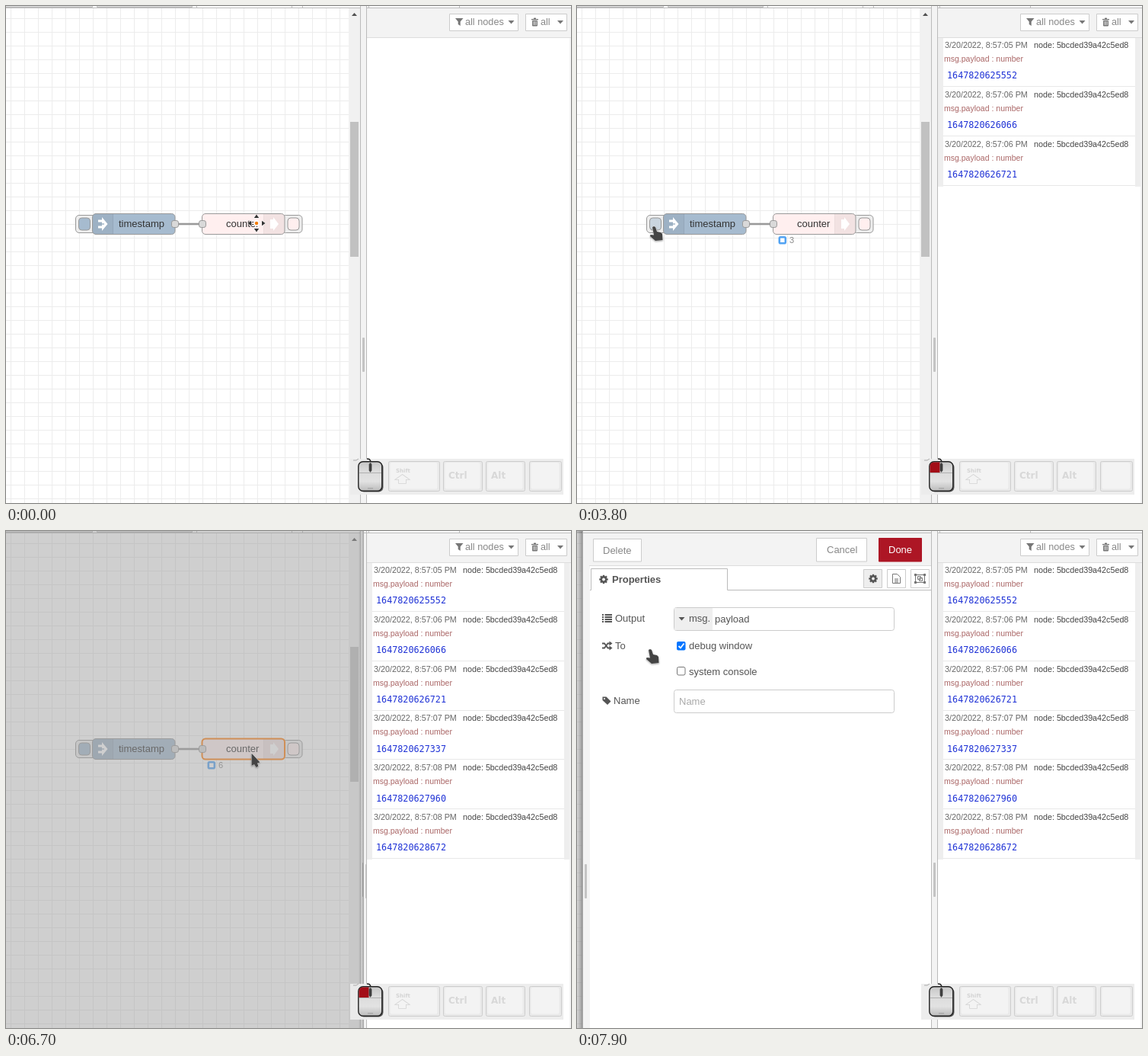
Animation, 742 px wide and 652 px high, one loop 8 s. Source, as an HTML page with a canvas:

```html
<!DOCTYPE html>
<html lang="en">
<head>
<meta charset="utf-8">
<title>Flow editor</title>
<style>
html, body { margin: 0; width: 100%; height: 100%; overflow: hidden; background: #fff; }
canvas { display: block; }
</style>
</head>
<body>
<canvas id="stage" width="742" height="652"></canvas>
<script>
const ctx = document.getElementById('stage').getContext('2d');
const LOOP = 8000, STEP = 50;
const SELECT = 6300, OPEN = 6700, RELEASE = 6800;
const SANS = '"Liberation Sans", Arial, sans-serif';
const MONO = '"DejaVu Sans Mono", monospace';
const KEYCAP = '"DejaVu Sans", sans-serif';

// Every click injects its clock time; the click's place in the loop follows from it
const clicks = [0, 514, 1169, 1785, 2408, 3120].map(offset => ({
  press: Math.round((2039 + offset) / STEP) * STEP,
  stamp: 1647820625552 + offset
}));
const MESSAGE_DELAY = 150, HOLD = 350;

// Pointer moves: start, end, destination and how far the arc bends downwards
const moves = [
  { from: 50, to: 100, x: 333, y: 284, bend: 0 },
  { from: 250, to: 1050, x: 126, y: 295, bend: -78 },
  { from: 1100, to: 1300, x: 194, y: 294, bend: 8 },
  { from: 1650, to: 1750, x: 102, y: 289, bend: 0 },
  { from: 5390, to: 6100, x: 322, y: 291, bend: 10 },
  { from: 7200, to: 7350, x: 367, y: 300, bend: 0 },
  { from: 7350, to: 7900, x: 97, y: 155, bend: -98 }
];
function pointerAt(t) {
  let x = 329, y = 285;
  for (const m of moves) {
    const k = Math.min(1, Math.max(0, (t - m.from) / (m.to - m.from)));
    x += (m.x - x) * k;
    y += (m.y - y) * k + m.bend * 4 * k * (1 - k);
  }
  return [x, y];
}

// CSS "ease": cubic-bezier(.25, .1, .25, 1)
function ease(x) {
  if (x <= 0 || x >= 1) return x <= 0 ? 0 : 1;
  let lo = 0, hi = 1, s;
  for (let i = 0; i < 20; i++) {
    s = (lo + hi) / 2;
    if (.75 * s * (1 - s) + s ** 3 < x) lo = s; else hi = s;
  }
  return .3 * s * (1 - s) ** 2 + 3 * s * s * (1 - s) + s ** 3;
}

function rect(x, y, w, h, fill) {
  ctx.fillStyle = fill;
  ctx.fillRect(x, y, w, h);
}
function paint(fill, stroke, width) {
  if (fill) { ctx.fillStyle = fill; ctx.fill(); }
  if (stroke) { ctx.strokeStyle = stroke; ctx.lineWidth = width; ctx.stroke(); }
}
function box(x, y, w, h, r, fill, stroke, width = 1) {
  ctx.beginPath();
  ctx.roundRect(x, y, w, h, r);
  paint(fill, stroke, width);
}
function disc(x, y, r, fill, stroke, width) {
  ctx.beginPath();
  ctx.arc(x, y, r, 0, 2 * Math.PI);
  paint(fill, stroke, width);
}
function trace(points) {
  ctx.beginPath();
  for (let i = 0; i < points.length; i += 2) ctx.lineTo(points[i], points[i + 1]);
}
function line(points, color, width = 1) {
  trace(points);
  paint(null, color, width);
}
function poly(points, fill, stroke, width = 1) {
  trace(points);
  ctx.closePath();
  paint(null, stroke, width);
  paint(fill);
}
function text(s, x, y, color, size = 13, family = SANS, weight = '') {
  ctx.font = `${weight} ${size}px ${family}`;
  ctx.fillStyle = color;
  ctx.fillText(s, x, y);
}
function at(x, y, draw) {
  ctx.save();
  ctx.translate(x, y);
  draw();
  ctx.restore();
}
function gradient(x0, y0, x1, y1, ...colors) {
  const g = ctx.createLinearGradient(x0, y0, x1, y1);
  colors.forEach((c, i) => g.addColorStop(i / (colors.length - 1), c));
  return g;
}
// Triangle pointing right, centred on its base
const head = (x, y, length, half, color) => poly([x, y - half, x + length, y, x, y + half], color);
const caret = (x, y, color) => poly([x - 4, y - 2, x + 4, y - 2, x, y + 2.5], color);

function drawWorkspace() {
  rect(0, 0, 742, 652, '#fff');
  for (let x = 6; x < 450; x += 18) rect(x, 3, 1, 649, '#ececec');
  for (let y = 16; y < 652; y += 18) rect(0, y, 450, 1, '#ececec');
  for (const [x, w] of [[-1, 115], [119, 126]]) box(x + .5, -1.5, w - 1, 3, 0, '#ddd', '#bbb');
  for (const x of [250, 375, 389]) rect(x, 0, 1, 2, '#bbb');
  rect(0, 2, 465, 1, '#bbb');

  rect(450, 3, 15, 649, '#f1f1f1');
  rect(452, 152, 11, 177, '#c1c1c1');
  poly([454, 13, 461, 13, 457.5, 9], '#505050');
}

function drawNodeButton(x, innerX, color, alpha) {
  box(x, 274.5, 26, 23, 4.5, '#eee', '#999');
  ctx.globalAlpha = alpha;
  box(innerX, 278, 15, 16, 4, color);
  ctx.globalAlpha = 1;
  box(innerX, 278, 15, 16, 4, null, '#999');
}
function drawNode(x, color, label, labelX, iconX, radii, edgeX, selected) {
  box(x, 272.5, 108.5, 27, 4.5, color);
  box(iconX, 272.5, 27, 27, radii, 'rgba(0,0,0,.05)');
  rect(edgeX, 273, 1, 26, 'rgba(0,0,0,.08)');
  box(x, 272.5, 108.5, 27, 4.5, null, selected ? '#ff7f0e' : '#999', selected ? 2 : 1);
  text(label, labelX, 290, '#333');
}
function drawFlow(t, count, held) {
  rect(222, 284.7, 36, 2.6, '#999');

  drawNodeButton(91.5, 95.5, '#a6bbcf', held ? .5 : 1);
  drawNode(113.5, '#a6bbcf', 'timestamp', 148, 113.5, [4.5, 0, 0, 4.5], 140);
  head(126, 286, 7.5, 9, '#fff');
  for (const y of [280.5, 288.5]) rect(121, y, 7, 3, '#fff');
  rect(121, 285.3, 8, 1.4, '#9db1c4');

  drawNodeButton(363, 370, '#ffefef', 1);
  drawNode(257.5, '#ffefef', 'counter', 289, 339, [0, 4.5, 4.5, 0], 338, t >= SELECT);
  rect(347, 280, 5, 12, '#fff');
  head(351, 286, 7, 9, '#fff');

  for (const x of [222, 258]) box(x - 4.5, 281.5, 9, 9, 2.7, '#d9d9d9', '#999');
  if (count) {
    box(265.8, 303.3, 8, 8, 1.5, '#fff', '#53a3f3', 2.6);
    text(count, 279, 311, '#888', 11);
  }
}

function drawSeparator() {
  rect(465, 0, 9, 652, '#f3f3f3');
  rect(465, 0, 1, 652, '#bbb');
  box(468, 435, 3, 45, 1, '#c4c4c4');
}

function gear(x, y, color) {
  at(x, y, () => {
    disc(0, 0, 3.2, null, color, 2.6);
    for (let i = 0; i < 8; i++) {
      ctx.rotate(Math.PI / 4);
      rect(-1.2, -5.7, 2.4, 2.5, color);
    }
  });
}
function trayButton(x, y, w, label, labelX, fill, border, color) {
  box(x + .5, y + .5, w, 39.5 - y, 0, fill, border);
  text(label, labelX, y + 20, color);
}
function drawTabs(dark, gray) {
  line([17, 77.5, 18.5, 77.5, 18.5, 49.5, 197.5, 49.5, 197.5, 77.5, 467, 77.5], '#bbb');
  gear(35, 63.5, dark);
  text('Properties', 46, 68, dark, 13, SANS, 'bold');
  for (let i = 0; i < 3; i++) box(376.5 + 31 * i, 50.5, 24, 24, 0, i ? '#fff' : '#eee', '#ccc');
  gear(389, 62.5, dark);

  poly([414.5, 56.5, 420.5, 56.5, 424.5, 60.5, 424.5, 68.5, 414.5, 68.5], null, gray);
  for (const y of [62.5, 64.5, 66.5]) rect(417, y, 5, 1, gray);

  box(444.5, 57.5, 12, 10, 0, null, gray);
  for (const x of [443, 455]) for (const y of [56, 66]) rect(x, y, 3, 3, gray);
  for (const d of [0, 2]) box(447.5 + d, 59.5 + d, 4, 4, 0, null, gray);
}
function drawForm(dark) {
  for (let y = 109; y < 120; y += 3) {
    rect(33, y, 2, 2, dark);
    rect(36.5, y, 9.5, 2, dark);
  }
  text('Output', 50, 119, dark);
  box(127.5, 100.5, 289, 30, 3, '#fff', '#ccc');
  rect(128, 101, 50, 29, '#efefef');
  caret(137.5, 115, dark);
  text('msg.', 147, 119, dark);
  text('payload', 181, 120, dark);

  for (const d of [-3, 3]) {
    line([33, 150.5 + d, 36, 150.5 + d, 40.5, 150.5 - d, 43, 150.5 - d], dark, 1.8);
    head(42.5, 150.5 + d, 4, 3, dark);
  }
  text('To', 50, 155, dark);
  box(131, 145, 11.5, 11.5, 2, '#0075ff');
  line([133.5, 151, 136, 153.5, 140.5, 147.5], '#fff', 1.8);
  text('debug window', 147, 155, dark);
  box(131.5, 178.5, 10.5, 10.5, 2, '#fff', '#767676');
  text('system console', 147, 189, dark);

  poly([33.5, 217.5, 38.5, 217.5, 44.5, 223.5, 40, 228, 33.5, 222], dark);
  disc(36, 220, 1, '#fff');
  text('Name', 48, 227, dark);
  box(127.5, 208.5, 289, 30, 3, '#fff', '#ccc');
  text('Name', 134, 228, '#aaa');
}
function drawTray(t) {
  rect(0, 0, 465, 652, 'rgba(160,160,160,.5)');
  const offset = Math.round(462 * (1 - ease((t - 6722) / 250)));
  ctx.save();
  ctx.beginPath();
  ctx.rect(0, 0, offset > 0 ? 473 : 465, 652);
  ctx.clip();
  ctx.translate(offset, 0);
  rect(1, 0, 6, 652, gradient(1, 0, 7, 0, 'rgba(0,0,0,0)', 'rgba(0,0,0,.25)'));
  rect(7, 0, 460, 652, '#f3f3f3');
  rect(17, 46, 450, 606, '#fff');
  rect(7, 2, 460, 1, '#bbb');
  rect(7, 0, 1, 652, '#aaa');
  rect(16, 45, 451, 1, '#ddd');
  box(10, 437, 3, 45, 1, '#c4c4c4');
  trayButton(21, 10, 63, 'Delete', 34, '#fff', '#ccc', '#888');
  trayButton(314, 9, 66, 'Cancel', 328, '#fff', '#ccc', '#888');
  trayButton(396, 9, 56, 'Done', 409, '#ad1625', '#ad1625', '#fff');
  drawTabs('#555', '#777');
  drawForm('#555');
  ctx.restore();
}

function drawMessage({ stamp }, i) {
  const top = 41 + 64.8 * i, y = Math.round(top);
  const second = Math.floor((stamp + 50) / 1000) % 60;
  for (const x of [474, 733]) rect(x, y + 1, 7, 65, '#eee');
  rect(481, y + 64, 252, 1, '#e8e8e8');
  text(`3/20/2022, 8:57:0${second} PM`, 483, Math.round(top + 13.9), '#666', 10.75);
  text('node: 5bcded39a42c5ed8', 600, Math.round(top + 13.9), '#444', 10.75);
  text('msg.payload : number', 482, Math.round(top + 32), '#a66', 10.5);
  text(stamp, 486, Math.round(top + 54.4), '#2033d6', 11.75, MONO);
}
function drawSidebar(count) {
  rect(474, 0, 268, 652, '#fff');
  rect(473, 0, 1, 652, '#bbb');
  rect(474, 2, 268, 1, '#bbb');
  for (const x of [476, 595]) rect(x, 0, 1, 2, '#bbb');
  rect(474, 3, 268, 38, '#f3f3f3');
  rect(474, 41, 268, 1, '#ddd');
  rect(740, 42, 2, 610, '#f3f3f3');

  const gray = '#777';
  box(582.5, 10.5, 90, 22, 0, '#fff', '#ccc');
  poly([590, 16, 600.5, 16, 596.7, 20.5, 596.7, 26, 593.7, 24, 593.7, 20.5], gray);
  text('all nodes', 603, 25, '#888', 12.7);
  caret(663.5, 21, gray);
  box(682.5, 10.5, 54, 22, 0, '#fff', '#ccc');
  rect(693, 15.6, 3, 1.4, gray);
  rect(690, 17, 9, 1.3, gray);
  box(691, 19, 7, 7.5, 1, gray);
  for (let i = 0; i < 3; i++) rect(692.5 + 1.7 * i, 20, .7, 5, '#fff');
  text('all', 702, 25, '#888', 12.7);
  caret(728, 21, gray);

  clicks.slice(0, count).forEach(drawMessage);
}

function drawMouse(pressed) {
  line([456, 596, 460, 596, 463, 594], '#aaa');
  line([474, 594, 477, 594.5, 479, 597], '#222', 1.4);
  box(464, 599, 31.5, 38.5, 6, 'rgba(0,0,0,.6)');
  box(462.8, 597.8, 31, 38.5, 6, gradient(0, 597, 0, 637, '#c4c4c4', '#dcdcdc', '#e2e2e2', '#b8b8b8'), '#222', 1.4);
  if (pressed) box(463.5, 598.5, 13, 13.5, [5, 0, 0, 0], '#a30d17');
  rect(464, 612, 29, 1, '#b0b0b0');
  rect(478, 599, 1, 13, '#888');
  box(477, 600, 3, 10.5, 1.5, '#444', '#222', .6);
  rect(475, 632, 7, 1.5, '#aaa');
}
function drawKeyOverlay(pressed) {
  rect(452, 594, 280, 47, 'rgba(237,237,237,.95)');
  for (const [x, w, label] of [[502, 67, ''], [574, 51, 'Ctrl'], [630, 51, 'Alt'], [687, 42, '']]) {
    box(x + .5, 597.5, w, 39, 2, '#e9e9e9', '#cdcdcd');
    box(x + 2.5, 599, w - 5, 34.5, 2, '#f3f3f3');
    text(label, x + 7, 620, '#d8d8d8', 12, KEYCAP, 'bold');
  }
  text('Shift', 512, 612, '#d4d4d4', 7, KEYCAP, 'bold');
  poly([520.5, 615, 529, 621, 525, 621, 525, 626, 516, 626, 516, 621, 512, 621], '#f3f3f3', '#d4d4d4', 1.6);
  drawMouse(pressed);
}

function softShadow() {
  ctx.lineJoin = 'round';
  ctx.shadowColor = 'rgba(0,0,0,.25)';
  ctx.shadowBlur = 2;
  ctx.shadowOffsetY = 1;
}
function strokes(lines) {
  for (const [color, width] of [['#fff', 3], ['#333', 1.4]]) lines.forEach(l => line(l, color, width));
}
const pointers = {
  move() {
    for (let i = 0; i < 4; i++) {
      poly([-3.2, -7, 3.2, -7, 0, -11.5], '#333', '#fff', 1);
      ctx.rotate(Math.PI / 2);
    }
    disc(0, 0, 3, '#f47d0b', '#fff', 1.5);
  },
  cross() { strokes([[-9, 0, 9, 0], [0, -9, 0, 9]]); },
  beam() { strokes([[-3, -8, 3, -8], [-3, 8, 3, 8], [0, -8, 0, 8]]); },
  arrow() {
    softShadow();
    poly([.5, .5, .5, 17, 4, 15, 6.5, 19, 9.5, 17.5, 8, 13.5, 11.5, 12.5], '#444', '#fff', 1);
  },
  hand() {
    softShadow();
    poly([-3, 1, -1, 0, 1, 1, 3, 7, 8, 8, 10, 10, 10.5, 18, 1, 19, -6, 13, -5.5, 11, -1, 11.5], '#444', '#fff', 1);
  }
};
function pointerKind(t, x, y) {
  if (t >= OPEN) {
    const inInput = x > 127 && x < 417 && (y > 100 && y < 131 || y > 208 && y < 239);
    return inInput ? 'beam' : x < 240 && y < 200 ? 'hand' : 'arrow';
  }
  if (t >= 6150) return 'arrow';
  if (y < 272 || y > 300) return 'cross';
  if (x > 91 && x < 114) return 'hand';
  return x >= 114 && x <= 223 || x >= 257 && x <= 366 ? 'move' : 'cross';
}

function draw(t) {
  const count = clicks.filter(c => t >= c.press + MESSAGE_DELAY).length;
  const held = clicks.some(c => t >= c.press && t < c.press + HOLD);
  drawWorkspace();
  drawFlow(t, count, held);
  drawSeparator();
  if (t >= OPEN) drawTray(t);
  drawSidebar(count);
  drawKeyOverlay(held || t >= SELECT && t < RELEASE);
  const [x, y] = pointerAt(t);
  at(x, y, pointers[pointerKind(t, x, y)]);
}

function frame() {
  const t = performance.now() % LOOP;
  draw(Math.floor(t / STEP) * STEP);
  requestAnimationFrame(frame);
}
frame();
</script>
</body>
</html>
```
